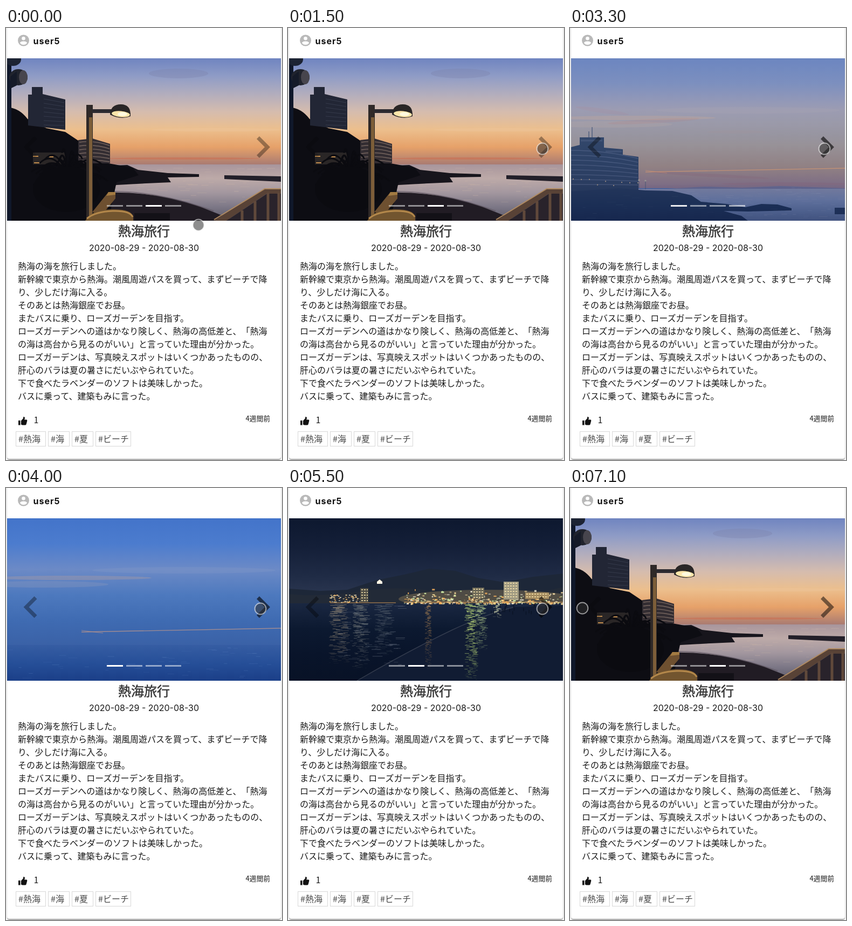
These frames come from a looping animation (512 px wide and 798 px high, 7.2 s). An HTML page:

```html
<!DOCTYPE html>
<html lang="ja">
<head>
<meta charset="utf-8">
<style>
html, body { margin: 0; width: 100%; height: 100%; overflow: hidden; background: #fff; }
#card {
  position: absolute; left: 2px; top: -6px; width: 508px; height: 802px; border-radius: 4px; background: #fff;
  box-shadow: 0 2px 1px -1px rgba(0,0,0,.25), 0 1px 1px rgba(0,0,0,.2), 0 1px 3px rgba(0,0,0,.3);
}
svg { position: absolute; left: 0; top: 0; display: block; }
text { font: 16px "Noto Sans CJK JP", "Noto Sans CJK", sans-serif; fill: #1a1a1a; text-spacing-trim: space-all; white-space: pre; }
.latin { font-family: Inter, sans-serif; }
</style>
</head>
<body>
<div id="card"></div>
<svg id="stage" width="512" height="798" viewBox="0 0 512 798">
  <defs><clipPath id="photo"><rect x="2" y="56" width="508" height="300"/></clipPath></defs>
  <circle cx="32.5" cy="23" r="10.5" fill="#b9b9b9"/>
  <circle cx="32.5" cy="19.2" r="3.3" fill="#fff"/>
  <path d="M25.8 27.5Q27 24.6 32.5 24.6T39.2 27.5Q36.8 31 32.5 31T25.8 27.5Z" fill="#fff"/>
  <text class="latin" x="50.5" y="30" style="font-weight:700;letter-spacing:1px;fill:#111">user5</text>
  <g id="slides" clip-path="url(#photo)"></g>
  <g id="bars" fill="#fff"></g>
  <g fill="none" stroke="#000" stroke-width="7" stroke-linejoin="miter">
    <path id="prev" d="M55 202.5L37.5 220L55 237.5"/>
    <path id="next" d="M467.5 202.5L485 220L467.5 237.5"/>
  </g>
  <text x="256" y="383.5" text-anchor="middle" style="font-size:24px;font-weight:500;fill:#363636;stroke:#363636;stroke-width:.5">熱海旅行</text>
  <text class="latin" x="256" y="412" text-anchor="middle">2020-08-29 - 2020-08-30</text>
  <g id="body"></g>
  <path d="M23 725h3.6v8.5h-3.6zM28 725.4L32 721V718.4Q34.8 717.6 35 720.4L34.2 723.6H38.2Q39.7 724 39.2 726L37.6 732Q37.1 733.6 35.4 733.6H30.5L28 732.4Z" fill="#111"/>
  <text x="51.5" y="730">1</text>
  <text x="490" y="726" text-anchor="end" style="font-size:12.8px">4週間前</text>
  <g id="tags"></g>
  <circle id="cursor" r="10.4" fill="#323232" fill-opacity=".55" stroke="#fff" stroke-opacity=".55" stroke-width="2"/>
</svg>
<script>
const NS = 'http://www.w3.org/2000/svg';
const $ = id => document.getElementById(id);

function add(parent, tag, attrs, text) {
  const node = document.createElementNS(NS, tag);
  for (const k in attrs) node.setAttribute(k, attrs[k]);
  if (text) node.textContent = text;
  parent.append(node);
  return node;
}
const path = (g, d, fill, extra) => add(g, 'path', { d, fill, ...extra });
const line = (g, d, stroke, width, extra) => path(g, d, 'none', { stroke, 'stroke-width': width, ...extra });
const rect = (g, x, y, width, height, fill, extra) => add(g, 'rect', { x, y, width, height, fill, ...extra });
const oval = (g, cx, cy, rx, ry, fill, extra) => add(g, 'ellipse', { cx, cy, rx, ry, fill, ...extra });

function rng(seed) {
  return () => (seed = (seed * 16807) % 2147483647) / 2147483647;
}

// Vertical gradient band from y0 to y1; stops are evenly spaced.
let gradients = 0;
function band(g, y0, y1, colors) {
  const id = 'grad' + gradients++;
  const lg = add(g, 'linearGradient', { id, x1: 0, y1: 0, x2: 0, y2: 1 });
  colors.forEach((c, i) => add(lg, 'stop', { offset: i / (colors.length - 1), 'stop-color': c }));
  rect(g, 2, y0, 508, y1 - y0, `url(#${id})`);
}

// Broken horizontal glints on water
function glints(g, seed, n, x, y, w, h, color, opacity) {
  const r = rng(seed);
  for (let i = 0; i < n; i++)
    rect(g, x + r() * w, y + r() * h, 5 + r() * 14, 1, color, { opacity: opacity * (.4 + .6 * r()) });
}

function blueDusk(g) {
  band(g, 56, 292, ['#4374ca', '#4c7cce', '#6c8ac6', '#4d79be', '#3f6bb2', '#3a61a6']);
  oval(g, 120, 166, 150, 4, '#b69f9f', { opacity: .35 });
  oval(g, 330, 152, 170, 6, '#8098c6', { opacity: .3 });
  oval(g, 70, 178, 120, 6, '#8f98b8', { opacity: .3 });
  line(g, 'M140 266Q330 263 510 259', '#c99a88', 1.4, { opacity: .7 });
  line(g, 'M140 263L180 268', '#c99a88', 1, { opacity: .6 });
  band(g, 290, 356, ['#365d a3'.replace(' ', ''), '#264f98', '#1b3f88']);
  glints(g, 31, 50, 2, 294, 490, 58, '#5f84c0', .3);
}

function night(g) {
  band(g, 56, 215, ['#0d182f', '#141f38', '#1f2b45', '#303b55']);
  path(g, 'M2 186L60 190L110 188L165 170L215 160L262 149L310 153L352 166L400 174L455 164L510 158V215H2Z', '#1d2738');
  path(g, 'M2 196Q60 202 140 190T300 196T510 183V216H2Z', '#222a37');
  oval(g, 370, 205, 165, 17, '#a98f5c', { opacity: .35 });
  band(g, 213, 356, ['#1a2741', '#0c1930', '#09142a', '#081226']);
  path(g, 'M128 356Q225 300 305 262Q370 232 420 220L510 217V356Z', '#111c33');
  line(g, 'M128 356Q225 300 305 262Q370 232 420 220', '#4b5262', 1.4, { opacity: .6 });
  const r = rng(77);
  const tones = ['#ffdf9d', '#ffb75e', '#f8f2d9', '#d4f2aa'];
  for (let i = 0; i < 300; i++) {
    const x = 215 + r() * 295;
    rect(g, x, 213 - r() * r() * 28, 1.5 + r() * 4, 1 + r() * 2.4, tones[r() * 4 | 0], { opacity: .5 + .5 * r() });
  }
  for (let i = 0; i < 60; i++)
    rect(g, 76 + r() * 58, 197 + r() * 14, 3, 1.5, tones[r() * 3 | 0], { opacity: .5 + .5 * r() });
  const block = (x, y, w, h, wall) => {
    rect(g, x, y, w, h, wall);
    for (let row = y + 3; row < y + h; row += 5)
      line(g, `M${x + 2} ${row}H${x + w - 1}`, '#fae6ae', 1.7, { 'stroke-dasharray': '3 2' });
  };
  block(134, 185, 15, 26, '#4f4d45');
  block(400, 173, 28, 33, '#a09a82');
  block(342, 184, 22, 20, '#6e6a58');
  block(440, 193, 44, 12, '#a28a5f');
  path(g, 'M165 177V173L170 169L175 173V177Z', '#fff5e4');
  line(g, 'M78 212H200M215 211H510', '#dda05c', 1.6, { opacity: .6 });
  // Reflections: x, width, length, colour, strength
  const streaks = [[95, 40, 110, '#b3a184', .6], [135, 34, 120, '#a3a498', .55], [178, 36, 95, '#8f9796', .4],
    [260, 14, 120, '#d29a58', .6], [340, 26, 140, '#cbe87e', .9], [358, 26, 85, '#bcd690', .8], [388, 16, 26, '#eef0bc', .9]];
  streaks.forEach(([x, w, h, color, op]) => {
    for (let i = 0; i < h; i++) {
      const f = 1 - i / h;
      const len = w * (.12 + r() * .5) * (.5 + f / 2);
      rect(g, x - w / 2 + r() * (w - len), 214 + i, len, 1.2, color, { opacity: op * Math.sqrt(f) * (.3 + .7 * r()) });
    }
  });
  glints(g, 9, 70, 75, 216, 130, 110, '#8a93a0', .4);
  for (let i = 0; i < 24; i++) rect(g, 372 + r() * 120, 211 + r() * 18, 1.5, 6, '#0b1426');
}

function lamp(g) {
  band(g, 56, 253, ['#6f84c0', '#8f9cc6', '#b2adbd', '#d5bcae', '#ecbf8d', '#e6a169', '#a87a72']);
  oval(g, 320, 84, 55, 9, '#7c81a9', { opacity: .35 });
  oval(g, 390, 188, 120, 3, '#eec49a', { opacity: .5 });
  oval(g, 330, 241, 140, 2, '#cb6f52', { opacity: .6 });
  band(g, 252, 356, ['#a8959c', '#bdaaa8', '#a3979f', '#7d7887', '#5b5968']);
  glints(g, 5, 70, 200, 256, 310, 65, '#d2b9a9', .4);
  path(g, 'M180 255L225 253L245 262L300 268L358 270V275L300 276L306 285L260 287L205 290L170 300Z', '#17151c');
  path(g, 'M405 272L510 274V284L405 279Z', '#221f29');
  path(g, 'M190 304Q280 302 360 330L425 356H170Z', '#211c24');
  line(g, 'M200 302Q285 302 385 338', '#5d535e', 2, { opacity: .6 });
  path(g, 'M2 146Q25 148 40 168L75 185L110 192L140 212L190 250L235 258L246 272L205 285L190 356H2Z', '#0d0d13');
  path(g, 'M41 123H48V109H68V122L110 132V188L41 180Z', '#222635');
  for (let i = 0; i < 7; i++) line(g, `M70 ${131 + i * 8}L108 ${138 + i * 7}`, '#353a4b', 1.2);
  path(g, 'M134 207L160 204L193 214V250H134Z', '#332d32');
  for (let i = 0; i < 6; i++) line(g, `M136 ${211 + i * 7}Q164 ${207 + i * 7} 192 ${217 + i * 6}`, '#77665f', 1.4);
  rect(g, 50, 230, 60, 22, '#2a2626');
  line(g, 'M50 237H60M52 249H62M80 238H88', '#c18c4d', 2);
  // Palm fronds
  const r = rng(42);
  for (let i = 0; i < 34; i++) {
    const a = Math.PI * (1 + i / 33) + (r() - .5) * .2, len = 48 + r() * 32;
    const x = 115 + Math.cos(a) * len, y = 268 + Math.sin(a) * len * .7;
    line(g, `M115 275Q${(115 + x) / 2} ${y - 8} ${x} ${y + 18}`, '#0b0b10', 3);
  }
  oval(g, 112, 298, 62, 42, '#0b0b10');
  rect(g, 2, 56, 8, 300, '#10182a');
  oval(g, 13, 58, 15, 12, '#1c2333');
  oval(g, 23, 91, 17, 15, '#20232d');
  oval(g, 32, 91, 8, 13, '#47454d');
  path(g, 'M8 90L20 80V106L8 112Z', '#151a28');
  rect(g, 149, 142, 12, 212, '#2f2928');
  rect(g, 154, 165, 6, 189, '#7d5e39');
  rect(g, 160, 150, 36, 7, '#2c2a30');
  path(g, 'M193 160Q194 141 213 141T231 163Q213 170 193 160Z', '#292626');
  oval(g, 213, 159, 17, 5.5, '#ffe6aa', { transform: 'rotate(5 213 159)' });
  oval(g, 216, 159, 9, 3.5, '#fff9df');
  path(g, 'M160 340L190 303H203V315L178 345Z', '#6e5030');
  path(g, 'M186 310L190 303H203V308Z', '#a37b42');
  path(g, 'M147 356Q158 336 195 335T236 348V356Z', '#72552f');
  line(g, 'M150 352Q166 339 198 338T235 349', '#b4884b', 3);
  rect(g, 238, 342, 66, 14, '#131117');
  path(g, 'M385 356L480 297H510V306H484L409 356Z', '#584236');
  path(g, 'M409 356L484 306H510V356Z', '#29232b');
  line(g, 'M386 354L480 297H510', '#b08a60', 2);
  line(g, 'M438 337V356M462 320V356M486 304V356M506 304V356', '#60493b', 5);
}

function hotel(g) {
  band(g, 56, 296, ['#9598b8', '#aaa2b2', '#c4aca8', '#dab392', '#e7b078', '#e49a59', '#b97467']);
  oval(g, 155, 172, 85, 4, '#e6a078', { opacity: .6, transform: 'rotate(-3 155 172)' });
  oval(g, 60, 153, 50, 4, '#d9a08b', { opacity: .5, transform: 'rotate(8 60 153)' });
  oval(g, 310, 192, 55, 3, '#eab07e', { opacity: .5 });
  oval(g, 260, 272, 110, 3, '#cf7754', { opacity: .6, transform: 'rotate(3 260 272)' });
  oval(g, 400, 288, 120, 3, '#c66f58', { opacity: .6 });
  path(g, 'M180 297L250 293L320 295L390 292L510 296V299H180Z', '#8b6c78');
  band(g, 297, 356, ['#b0989a', '#98909f', '#7d7b8d', '#666576']);
  glints(g, 15, 70, 150, 300, 350, 48, '#c7afaa', .4);
  path(g, 'M2 220L18 216V202H63V221L98 224V234L127 238V302H2Z', '#1c191c');
  line(g, 'M41 202V183M35 202V191', '#332d30', 1.2);
  for (let i = 0; i < 8; i++) line(g, `M2 ${226 + i * 9}Q66 ${226 + i * 9} 126 ${241 + i * 7}`, '#4a4346', 1.6);
  line(g, 'M20 208H60M66 228H96', '#3a3437', 3);
  const r = rng(8);
  for (let i = 0; i < 9; i++) rect(g, 5 + i * 15, 278 + r() * 16, 2, 2, '#e0a557');
  line(g, 'M128 296V281M140 298V282', '#5a4943', 1);
  oval(g, 128, 281, 1.8, 1.5, '#f4c77e');
  oval(g, 140, 282, 1.8, 1.5, '#f4c77e');
  path(g, 'M2 302L90 296L140 300L190 301L225 309L243 321L290 325L325 331L355 325L385 326L411 333V337L330 339L285 338L318 347L330 356H2Z', '#131116');
  path(g, 'M491 332H510V344H491Z', '#1c1a21');
}

const slides = [blueDusk, night, lamp, hotel].map(draw => {
  const g = add($('slides'), 'g', {});
  draw(g);
  return g;
});
const bars = slides.map((_, i) => rect($('bars'), 187 + i * 36, 327, 30, 3, '#fff'));

[
  '熱海の海を旅行しました。',
  '新幹線で東京から熱海。潮風周遊パスを買って、まずビーチで降',
  'り、少しだけ海に入る。',
  'そのあとは熱海銀座でお昼。',
  'またバスに乗り、ローズガーデンを目指す。',
  'ローズガーデンへの道はかなり険しく、熱海の高低差と、「熱海',
  'の海は高台から見るのがいい」と言っていた理由が分かった。',
  'ローズガーデンは、写真映えスポットはいくつかあったものの、',
  '肝心のバラは夏の暑さにだいぶやられていた。',
  '下で食べたラベンダーのソフトは美味しかった。',
  'バスに乗って、建築もみに言った。'
].forEach((s, i) => add($('body'), 'text', { x: 22, y: 446 + i * 24 }, s));

[['#熱海', 18, 56], ['#海', 78, 40], ['#夏', 122, 40], ['#ビーチ', 166, 66]].forEach(([s, x, w]) => {
  rect($('tags'), x + .5, 745.5, w - 1, 27, '#fff', { stroke: '#d8d8d8' });
  add($('tags'), 'text', { x: x + 5, y: 765, style: 'fill:#4a4a4a' }, s);
});

function bezier(x1, y1, x2, y2) {
  const at = (a, b, u) => 3 * a * u * (1 - u) ** 2 + 3 * b * u * u * (1 - u) + u ** 3;
  return x => {
    if (x <= 0) return 0;
    if (x >= 1) return 1;
    let lo = 0, hi = 1;
    for (let i = 0; i < 20; i++) {
      const mid = (lo + hi) / 2;
      if (at(x1, x2, mid) < x) lo = mid; else hi = mid;
    }
    return at(y1, y2, lo);
  };
}
const ease = bezier(.25, .1, .25, 1);
const easeInOut = bezier(.42, 0, .58, 1);

// Keys are [time, ...values]; values are eased between neighbours.
function track(keys, t) {
  let i = 0;
  while (i < keys.length - 2 && t >= keys[i + 1][0]) i++;
  const [a, b] = [keys[i], keys[i + 1]];
  const p = easeInOut((t - a[0]) / (b[0] - a[0]));
  return a.slice(1).map((v, n) => v + (b[n + 1] - v) * p);
}

const LOOP = 7200, FADE = 600;
const clicks = [1600, 3000, 4450, 6050];
const cursorKeys = [[0, 357, 364], [200, 357, 364], [1000, 472, 223], [6100, 472, 223], [6300, 409, 247], [7000, 23, 222], [7100, 23, 222]];
const nextKeys = [[0, .35], [1500, .35], [1800, .6], [6100, .6], [6300, .5], [7100, .5]];
const prevKeys = [[0, .15], [1600, .15], [2500, .25], [3300, .35], [6000, .35], [6600, .15]];

function render(t) {
  const n = clicks.filter(c => t >= c).length;
  const now = (n + 2) % 4, old = (n + 1) % 4;
  const raw = n ? Math.min(1, (t - clicks[n - 1]) / FADE) : 1;
  const p = easeInOut(raw), q = ease(raw);
  slides.forEach((g, i) => {
    let o = i === now ? p : i === old ? 1 - p : 0;
    if (i === Math.min(now, old) && o > 0) o = 1;
    g.setAttribute('opacity', o);
    g.setAttribute('display', o ? 'inline' : 'none');
    bars[i].setAttribute('opacity', .5 + .5 * (i === now ? q : i === old ? 1 - q : 0));
  });
  const [x, y] = track(cursorKeys, t);
  $('cursor').setAttribute('cx', x);
  $('cursor').setAttribute('cy', y);
  $('next').setAttribute('opacity', track(nextKeys, t)[0]);
  $('prev').setAttribute('opacity', track(prevKeys, t)[0]);
}

const start = performance.now();
function tick() {
  const t = (performance.now() - start) % LOOP;
  render(Math.floor(t / 100) * 100);
  requestAnimationFrame(tick);
}
tick();
</script>
</body>
</html>
```
